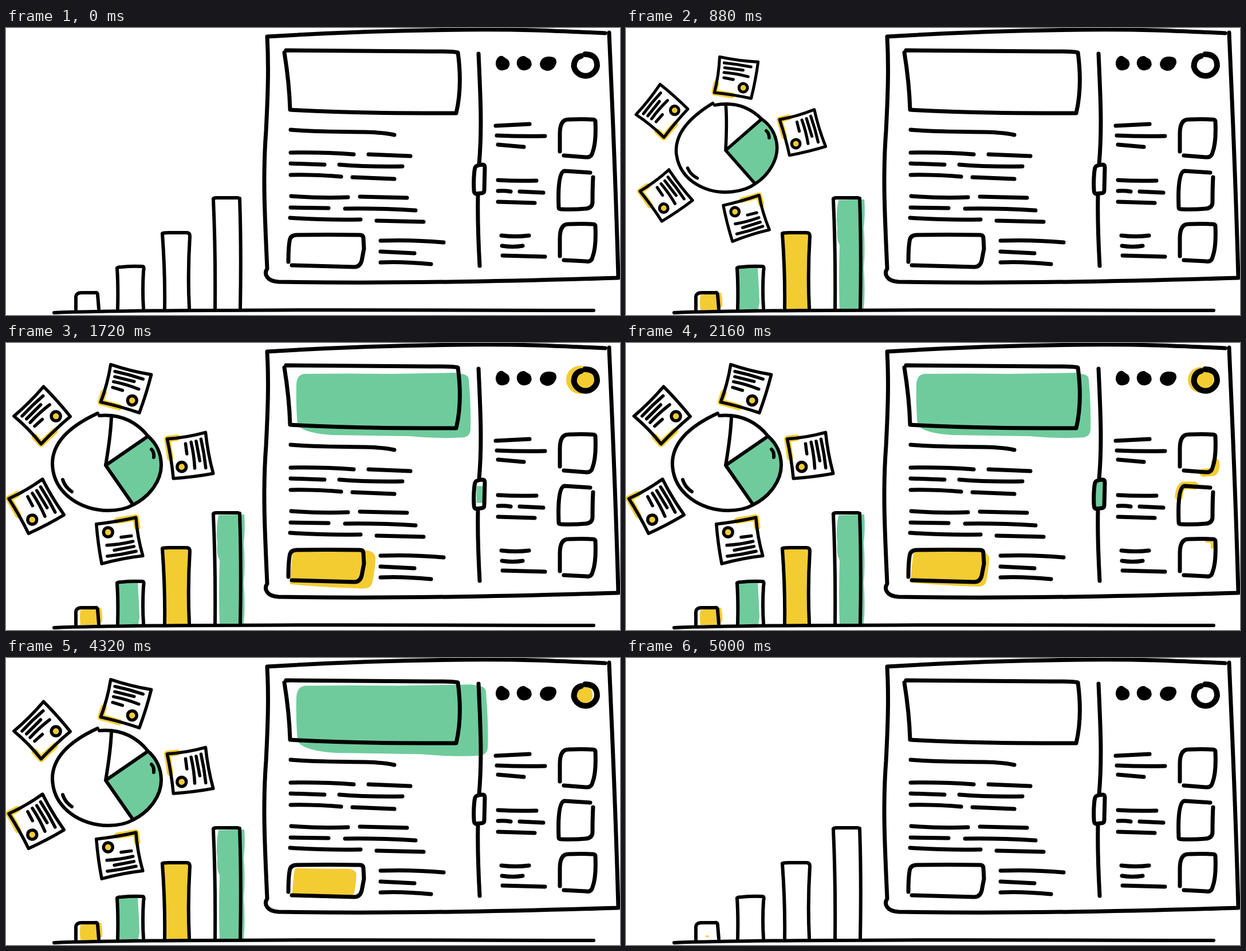
An HTML page for the animation above (5040 ms loop, 1072 by 502 pixels).

```html
<!DOCTYPE html>
<html lang="en">
<head>
<meta charset="utf-8">
<title>Dashboard sketch</title>
<style>
html, body { margin: 0; width: 100%; height: 100%; overflow: hidden; background: #fff; }
svg { display: block; width: 1072px; height: 502px; }
.ink { fill: none; stroke: #000; stroke-width: 7; stroke-linecap: round; stroke-linejoin: round; }
.thin { stroke-width: 6; }
.fine { stroke-width: 5.5; }
.bold { stroke-width: 10; }
.green { fill: #6fcb9c; }
.yellow { fill: #f3cc32; }
.edge { fill: none; stroke: #f3cc32; stroke-width: 13; stroke-linecap: round; stroke-linejoin: round; }
.slim { stroke-width: 11; }
</style>
</head>
<body>
<svg viewBox="0 0 1072 502">
  <defs>
    <g id="note">
      <path fill="#fff" d="M-36-34Q0-31 37-34Q37 0 33 36Q0 33-37 34Q-33 0-36-34Z"/>
      <path class="edge slim" d="M-36 17L-37 34Q-20 34 -4 35"/>
      <path class="ink fine" d="M-36-34Q0-31 37-34Q37 0 33 36Q0 33-37 34Q-33 0-36-34ZM-26-24Q0-25 25-23M-24-15L11-15M-24-6Q0-7 22-4M-23 4L-5 5"/>
      <circle class="yellow" cx="15.6" cy="18" r="8" stroke="#000" stroke-width="5.5"/>
    </g>
  </defs>

  <g id="bars">
    <path class="yellow" data-x="141" data-y="488" data-start="69" data-len="400" d="M130 467Q148 464 166 463Q169 476 168 488L161 489L160 493H130Q128 480 130 467Z"/>
    <path class="green" data-x="217" data-y="491" data-start="210" data-len="400" d="M194 420L230 419Q232 450 233 480L231 492H194Z"/>
    <path class="yellow" data-x="297" data-y="491" data-start="350" data-len="400" d="M275 361L319 360Q316 430 319 492H277Q279 430 275 361Z"/>
    <path class="green" data-x="391" data-y="491" data-start="492" data-len="400" d="M371 301L416 300Q418 325 415 350Q418 385 415 420Q418 460 415 491L373 492Q371 440 373 380Q367 370 369 350Q366 325 371 301Z"/>
  </g>

  <g id="pie">
    <path class="green" d="M174 214L248 163Q271 186 271 214Q270 258 222 284Z"/>
    <path class="ink thin" d="M160 123C110 146 81 175 81 211C82 262 130 293 178 293C196 293 210 290 222 283C252 268 271 240 271 214C271 193 262 175 248 163C228 138 200 124 163 127
      M184 129C183 160 178 190 174 214L248 163M174 214L222 283M254 186Q259 191 258 200M99 239Q103 252 115 260"/>
    <use href="#note" transform="translate(209.5 79.3)rotate(14)"/>
    <use href="#note" transform="translate(321.6 198)rotate(79.5)"/>
    <use href="#note" transform="translate(197 345.7)rotate(169)"/>
    <use href="#note" transform="translate(53.2 286.4)rotate(59)"/>
    <use href="#note" transform="translate(63.4 126.4)rotate(-45)"/>
  </g>

  <path class="green" data-x="507" data-y="110" data-start="1080" data-len="640" d="M520 54Q600 53 670 54Q730 53 785 52L800 55Q808 57 808 65Q812 110 811 152Q810 163 800 165Q760 168 705 163Q640 162 570 161Q520 158 509 143Q506 110 507 72Q508 56 520 54Z"/>
  <path class="yellow" data-x="512" data-y="388" data-start="1270" data-len="680" d="M508 363Q560 365 612 364Q635 365 634 378Q633 400 629 416Q627 427 612 426Q550 424 497 419Q498 395 501 372Q502 363 508 363Z"/>
  <circle class="yellow" data-x="1016" data-y="66" data-start="1270" data-len="680" cx="1003.5" cy="64.5" r="22.5"/>
  <rect class="green" data-x="827" data-y="265" data-start="1600" data-len="720" x="818" y="241" width="18" height="48" rx="2"/>
  <path class="edge" data-x="1018" data-y="218" data-start="1720" data-len="720" d="M1028 210Q1029 222 1024 225L1009 226"/>
  <path class="edge" data-x="980" data-y="259" data-start="1850" data-len="720" d="M966 268Q967 254 973 250Q980 249 992 250"/>
  <path class="edge" data-x="1020" data-y="351" data-start="2088" data-len="750" d="M1005 340Q1018 340 1025 342Q1031 349 1028 367"/>

  <path class="ink thin" d="M84 498C240 492 650 493 1026 494
    M122 492V473Q121 463 132 463L156 463Q160 462 160 467L162 491
    M195 491Q196 450 194 421Q193 418 202 418Q220 416 238 417Q242 417 240 425Q238 460 240 490
    M277 491Q278 430 273 360Q272 358 285 358L315 358Q321 358 321 364Q317 430 320 490
    M365 491Q366 390 362 300Q361 297 368 297H405M408 298Q411 390 409 490"/>
  <path class="ink" d="M456 15C600 6 700 4 800 3S960 5 1046 9
    M456 15C459 70 457 120 454 180C448 260 452 330 456 421C450 430 455 443 476 444C650 447 850 444 1069 437C1064 250 1059 150 1053 8
    M486 43C492 80 495 110 496 143C600 149 700 149 786 149C794 115 794 80 789 43C780 40 765 41 740 41L489 39
    M497 178C570 184 630 180 648 183Q665 184 678 187
    M497 218Q555 217 607 221M633 221L706 224
    M497 237L556 239M582 239Q630 243 692 242
    M497 257Q540 256 585 260M605 261L678 264
    M498 294Q550 298 597 296M618 295L700 297
    M497 314L563 315M592 316Q650 315 715 319
    M496 332Q550 336 619 335M647 337L729 339
    M493 409Q493 385 495 373Q496 362 508 362Q560 361 618 362Q624 362 624 368L625 386L621 407Q618 418 608 418L499 415
    M654 372Q710 370 764 375M654 391L713 394M654 410Q690 408 742 413"/>
  <path class="ink" d="M825 45C829 130 831 180 826 238M824 292C823 340 825 380 827 416
    M818 249L819 244Q820 240 832 239Q836 239 836 244L835 284Q835 289 829 289L820 290Q817 289 817 283Q816 265 818 249
    M855 171L914 168M857 188Q900 190 941 189M859 204L904 208
    M859 266Q890 268 926 267M859 285Q870 284 881 286M897 286L938 288M859 304L923 306
    M865 363Q890 366 913 363M866 381Q885 384 902 381M867 398L941 400
    M967 216V185Q967 160 982 160Q1005 159 1024 160Q1029 160 1029 164C1030 185 1029 205 1024 218Q1022 227 1012 226L974 223
    M1020 253L975 250C964 251 964 290 965 314Q965 317 970 317Q990 318 1012 316Q1024 315 1024 304Q1024 280 1025 261
    M967 399V368Q967 343 982 343Q1005 342 1024 343Q1029 343 1029 347C1030 368 1029 388 1024 401Q1022 410 1012 408L974 406"/>
  <path class="ink bold" d="M1011 46Q1032 46 1032 66A20.5 20.5 0 0 1 991.5 67Q992 52 1004 49"/>
  <path d="M867 49L877 56Q882 64 876 71Q867 77 859 72Q852 64 857 54Q861 48 867 49Z
    M905 49L915 55Q921 64 914 71Q906 77 897 72Q889 65 893 55Q898 48 905 49Z
    M946 50Q962 49 961 61Q957 75 944 75Q932 72 932 63Q934 51 946 50Z"/>
</svg>
<script>
const LOOP = 5040, STEP = 40, FULL = 2880, REWIND = 3600;
const pops = [...document.querySelectorAll('[data-start]')].map(el => {
  const { x, y, start, len } = el.dataset;
  return { el, x, y, start: +start, len: +len };
});
const pie = document.getElementById('pie');

const progress = (t, start, len) => Math.min(1, Math.max(0, (t - start) / len));
const backOut = p => p ? 1 + 2.70158 * (p - 1) ** 3 + 1.70158 * (p - 1) ** 2 : 0;
const sineInOut = p => (1 - Math.cos(Math.PI * p)) / 2;

function place(el, x, y, scale, turn = 0) {
  el.setAttribute('visibility', scale > 0 ? 'visible' : 'hidden');
  el.setAttribute('transform', `translate(${x} ${y}) rotate(${turn}) scale(${scale}) translate(${-x} ${-y})`);
}

// Builds up at normal speed, holds, then rewinds twice as fast.
function draw(ms) {
  const clock = Math.floor(ms % LOOP / STEP + 0.01) * STEP;
  const t = clock < REWIND ? Math.min(clock, FULL) : FULL - 2 * (clock - REWIND);
  for (const p of pops) place(p.el, p.x, p.y, backOut(progress(t, p.start, p.len)));
  const s = sineInOut(progress(t, 480, 484));
  place(pie, 174, 214, s, -90 * (1 - s));
}

let began;
function tick(now) {
  began ??= now;
  draw(now - began);
  requestAnimationFrame(tick);
}
draw(0);
requestAnimationFrame(tick);
</script>
</body>
</html>
```
